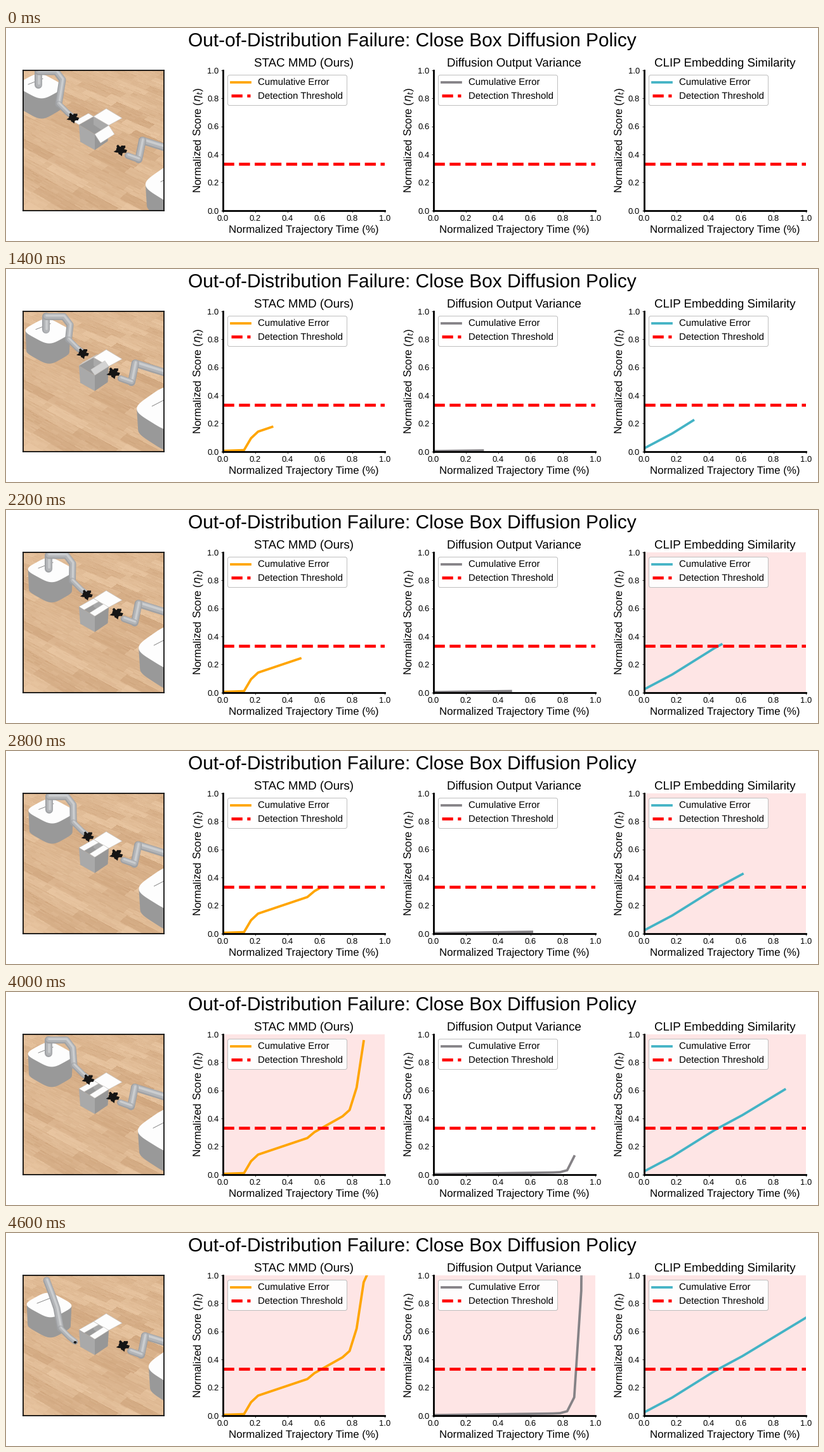
These frames come from a looping animation (1280x337 px, 6800 ms). A matplotlib script:

```python
import numpy as np
import matplotlib.pyplot as plt
from matplotlib.animation import FuncAnimation
from matplotlib.patches import Polygon

W, H, DPI = 1280, 337, 64
PX = 72 / DPI              # points per pixel
S = W / 19 / DPI           # layout designed for a 19 inch wide figure
STEPS, FRAMES = 23, 34
LIMIT = 1 / 3
TOP, SIDE = 66.8, 222

plt.rcParams.update({
    "font.family": "Liberation Sans", "text.hinting": "none",
    "axes.titlesize": 20 * S, "axes.labelsize": 18 * S,
    "xtick.labelsize": 14 * S, "ytick.labelsize": 14 * S,
    "legend.fontsize": 16 * S, "axes.titlepad": 6 * S, "axes.labelpad": 4 * S,
    "patch.linewidth": S,
})
for axis in ("xtick", "ytick"):
    plt.rcParams.update({axis + ".major.size": 3.5 * S,
                         axis + ".major.pad": 3.5 * S,
                         axis + ".major.width": 0.8 * S})

fig = plt.figure(figsize=(W / DPI, H / DPI), dpi=DPI, facecolor="white")
fig.suptitle("Out-of-Distribution Failure: Close Box Diffusion Policy",
             fontsize=32 * S)


def add_axes(x, w):
    return fig.add_axes([x / W, 1 - (TOP + SIDE) / H, w / W, SIDE / H])


# ---------- score plots ----------
steps = np.arange(STEPS + 1)
time = steps / STEPS
stac = np.interp(steps, [0, 3, 4, 5, 12, 13, 17, 18, 19, 20, 21],
                 [.005, .01, .095, .142, .26, .302, .415, .46, .62, .95, 1.06])
variance = .003 + .0155 * time + .0147 * 7.7 ** (steps - 19)
similarity = np.interp(steps, [0, 4, 10, 14, 23], [.022, .128, .316, .424, .697])


def make_plot(column, title, color, scores):
    ax = add_axes(341.9 + 331.9 * column, 255.2)
    line, = ax.plot([], [], color=color, lw=4 * S, label="Cumulative Error")
    ax.axhline(LIMIT, color="red", ls="--", lw=5 * S, label="Detection Threshold")
    ax.set(xlim=(0, 1), ylim=(0, 1), title=title,
           xlabel="Normalized Trajectory Time (%)",
           ylabel=r"Normalized Score ($\eta_t$)")
    ax.spines[["top", "right"]].set_visible(False)
    ax.spines[["left", "bottom"]].set_linewidth(3 * S)
    ax.legend(loc="upper left", framealpha=0.95, edgecolor="#b8b8b8")
    return ax, line, scores


plots = [make_plot(0, "STAC MMD (Ours)", "orange", stac),
         make_plot(1, "Diffusion Output Variance", "#858286", variance),
         make_plot(2, "CLIP Embedding Similarity", "#43b3c5", similarity)]

# ---------- camera view, drawn in stage pixels ----------
LEFT = 27.2
cam = add_axes(LEFT, SIDE)
cam.set(xticks=[], yticks=[])
for spine in cam.spines.values():
    spine.set(linewidth=1.7 * PX, zorder=100)


def wood_floor(n=SIDE):
    rng = np.random.default_rng(4)
    x, y = np.meshgrid(np.arange(n) - n / 2, np.arange(n) - n / 2)
    depth = 1 + y * 0.0016
    v = (y - 0.48 * x) / depth / 12.5 + 40
    row = np.floor(v).astype(int)
    u = (0.6 * x + 0.8 * y) / depth / 52 + 20 + rng.random(90)[row]
    plank = np.floor(u).astype(int)
    tone = rng.normal(0, 0.38, (90, 50))[row, plank]
    tone += rng.normal(0, 0.14, (700, 260))[(v * 7).astype(int), (u * 6).astype(int)]
    tone = np.clip(tone, -1, 0.8) - 0.35 * (v - row < 0.07)
    rgb = np.array([221, 183, 145]) + tone[..., None] * np.array([14, 18, 20])
    return np.clip(rgb, 0, 255).astype(np.uint8)


cam.imshow(wood_floor(), extent=(LEFT, LEFT + SIDE, TOP + SIDE, TOP),
           aspect="auto", interpolation="nearest", zorder=0)
cam.set(xlim=(LEFT, LEFT + SIDE), ylim=(TOP + SIDE, TOP))


def next_layer():
    return 1 + 0.1 * (len(cam.patches) + len(cam.lines))


def poly(points, color, edge="none", lw=0.0):
    return cam.add_patch(Polygon(points, closed=True, fc=color, ec=edge,
                                 lw=lw * PX, zorder=next_layer()))


def rod(width, color):
    line, = cam.plot([], [], color=color, lw=width * PX, zorder=next_layer(),
                     solid_capstyle="round", solid_joinstyle="round")
    return line


class Base:
    """White-topped mobile base: a rounded square swept straight down."""

    def __init__(self, center, a, b, drop):
        angle = np.linspace(0, 2 * np.pi, 80)
        c, s = np.cos(angle), np.sin(angle)
        c, s = np.sign(c) * np.sqrt(abs(c)), np.sign(s) * np.sqrt(abs(s))
        center, a, b = map(np.array, (center, a, b))
        self.rim = center + c[:, None] * a + s[:, None] * b
        ends = self.rim[[self.rim[:, 0].argmin(), self.rim[:, 0].argmax()]]
        low = self.rim[self.rim[:, 1] >= np.interp(self.rim[:, 0], *ends.T)]
        low = low[low[:, 0].argsort()]
        low = center + (low - center) * [0.96, 1] + [0, drop]
        self.skirt = np.vstack([ends[:1], low, ends[1:]])
        self.slit = np.array([center - 0.55 * a - 0.35 * b, center - 0.4 * a + 0.65 * b])
        self.parts = poly(self.skirt, "#999999"), poly(self.rim, "#fdfdfd")
        self.mark = rod(0.9, "#808080")

    def move(self, shift):
        self.parts[0].set_xy(self.skirt + shift)
        self.parts[1].set_xy(self.rim + shift)
        self.mark.set_data(*(self.slit + shift).T)


class Limb:
    """Grey tube: three strokes shading from dark to light."""

    def __init__(self, width):
        self.rods = [rod(width, "#9fa1a4"), rod(width * 0.75, "#b3b5b8"),
                     rod(width * 0.3, "#cbcdcf")]

    def move(self, points):
        for n, r in enumerate(self.rods):
            r.set_data(points[:, 0] + 0.4 * n, points[:, 1] - 0.8 * n)


def claw():
    a = np.linspace(0, 2 * np.pi, 22, endpoint=False)
    radius = 7.2 + 1.8 * np.sin(5 * a) + 1.2 * np.cos(9 * a)
    return np.c_[1.1 * radius * np.cos(a), 0.95 * radius * np.sin(a)]


CLAW = claw()
left_base = Base((36, 95), (22, 12), (20, -11), 32)

# Open box: fixed body and lid, two flaps that fold inwards
back, left, front, right = map(np.array, [(138, 140), (115, 153), (140, 168), (162, 154)])
down = np.array([0, 25])
poly([left, front, right, back], "#999999")
poly([back, right, (150, 161), (138, 153)], "#a9a9a9")
poly([back, (158, 127.5), (183, 142.5), right], "#fdfdfd", "#c4c0bc", 0.6)
far_flap = poly([left, back, back], "white", "#c8c4c0", 0.5)
poly([left, front, front + down, left + down + (2, 2)], "#a9a9a9")
poly([front, right, right + down - (1.5, 0), front + down], "#979797")
near_flap = poly([front, right, right], "white", "#c8c4c0", 0.5)

left_column = Limb(12)
left_upper, left_lower = Limb(11), Limb(9)
left_claw = poly(CLAW, "#151515")
right_base = Base((256, 223), (32, 20), (30, -21), 33)
right_upper, right_link, right_lower = Limb(12), Limb(12), Limb(10)
right_claw = poly(CLAW, "#151515")

# Way points: start, grasp, hold, last hold, retreat
KEYS = [0, 4, 12, 20, 23]
LEFT_BASE = [(18, -3), (27, 6), (35, -1), (34, 4), (32, 19)]
LEFT_GRIP = [(106, 142), (117, 133), (129, 134), (130, 138), (109, 173)]
RIGHT_BASE = [(16, 24), (0, 0), (6, -6), (4, -4), (21, -12)]
RIGHT_GRIP = [(181, 193), (166, 165), (176, 163), (169, 166), (185, 178)]
# Joints relative to the base (foot, head, shoulder, elbow) or to the gripper
REACH = np.array([(33, 93), (33, 72), (61, 72), (71, 85)])
RETREAT = np.array([(35, 93), (32, 56), (40, 77), (48, 100)])
LEFT_TIP = np.array([(-23, -22), (-9, -8), (0, -1)])
RIGHT_TIP = np.array([(11, 9), (28, 15), (34, -15), (85, 1)])


def along(path, k):
    return np.array([np.interp(k, KEYS, axis) for axis in np.array(path).T])


def draw_camera(k):
    retreat = np.clip((k - 20) / 3, 0, 1)
    base, grip = along(LEFT_BASE, k), along(LEFT_GRIP, k)
    left_base.move(base)
    arm = REACH + retreat * (RETREAT - REACH) + base
    tip = LEFT_TIP + grip
    left_column.move(arm[:2] + retreat * (arm[[0, 0]] - arm[:2]))
    left_upper.move(np.vstack([arm[1:], tip[:1]]))
    left_lower.move(tip)
    left_claw.set_xy(CLAW * (1 - 0.7 * retreat) + grip)

    right_base.move(along(RIGHT_BASE, k))
    grip = along(RIGHT_GRIP, k)
    tip = RIGHT_TIP + grip
    right_lower.move(tip[:2])
    right_link.move(tip[1:3])
    right_upper.move(tip[2:])
    right_claw.set_xy(CLAW * 1.08 + grip)

    # Each flap swings from outside, over upright, to flat
    fold = np.pi * min(k / 9, 1)
    far = np.array([-8, -5]) * np.cos(fold) - [0, 14 * np.sin(fold)]
    near = np.array([9, 14]) * (np.cos(fold) * 0.75 + 0.25 * (fold < np.pi / 2))
    near = near - [0, 15 * np.sin(fold)]
    if fold > np.pi / 2:
        near = near * [1.2, 0.5]
    shade = str(0.99 - 0.25 * np.sin(fold))
    far_flap.set(xy=[left, back, back + far, left + far], facecolor=shade)
    near_flap.set(xy=[front, right, right + near, front + near], facecolor=shade)


def update(frame):
    k = min(frame, STEPS)
    for ax, line, scores in plots:
        line.set_data(time[:k + 1], scores[:k + 1])
        ax.set_facecolor("#fee5e5" if scores[k] > LIMIT else "white")
    draw_camera(k)
    return []


anim = FuncAnimation(fig, update, frames=FRAMES, interval=200,
                     init_func=lambda: update(0), repeat=True, repeat_delay=0)
plt.show()
```
